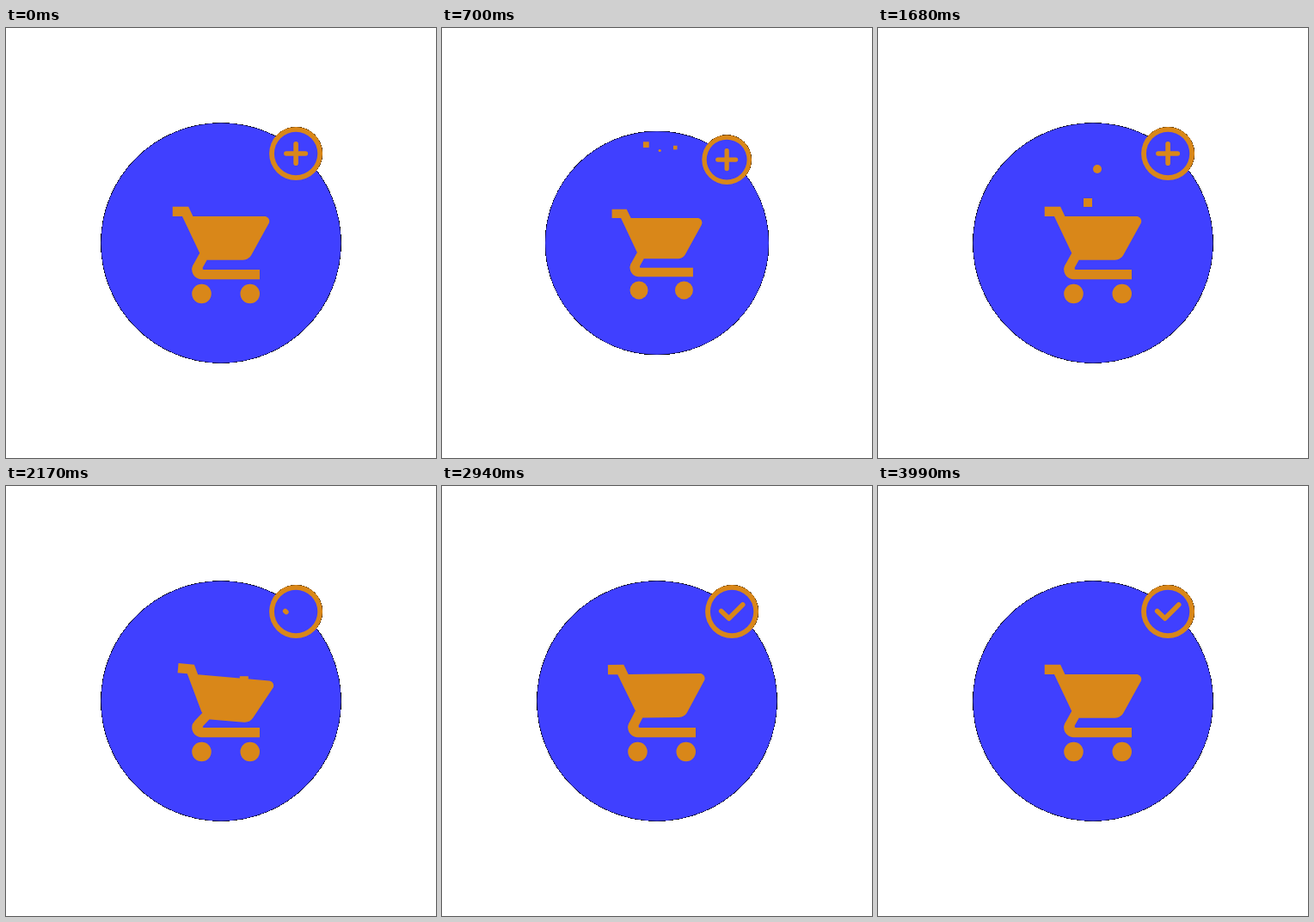
These frames come from a looping animation (500x500 px, 4.34 s). An HTML page:

```html
<!DOCTYPE html>
<html lang="en">
<head>
<meta charset="utf-8">
<title>Add to cart</title>
<style>
  html, body { margin: 0; width: 100%; height: 100%; overflow: hidden; background: #fff; }
  svg { display: block; width: 100%; height: 100%; }
  .blue { fill: #4040ff; }
  .orange { fill: #d98719; }
  .line { fill: none; stroke: #d98719; stroke-width: 5.6; stroke-linecap: round; stroke-linejoin: round; }
</style>
</head>
<body>
<svg viewBox="0 0 500 500">
  <g id="scene">
    <!-- dark, unsmoothed rim behind both discs -->
    <g shape-rendering="crispEdges">
      <circle cx="250" cy="250" r="140"/>
      <circle cx="337.1" cy="146" r="31.2"/>
    </g>
    <circle class="blue" cx="250" cy="250" r="139.4"/>
    <g id="items" class="orange">
      <rect/>
      <rect/>
      <circle/>
    </g>
    <g class="orange" transform="translate(188.1 196.5) scale(5.625)">
      <circle cx="7" cy="20" r="2"/>
      <circle cx="17" cy="20" r="2"/>
      <path d="M5.25 14.04c-.16.28-.25.61-.25.96 0 1.1.9 2 2 2h12v-2H7.42c-.14 0-.25-.11-.25-.25l.03-.12z"/>
      <polygon id="strut" points="6.6,11.59 8.1,12 8.1,13 7.2,14.63 7,15.5 5,15 5.25,14.04"/>
      <path id="basket" d="M1 2v2h2l3.6 7.59 1.5 1.41h7.45c.75 0 1.41-.41 1.75-1.03l3.58-6.49c.08-.14.12-.31.12-.48 0-.55-.45-1-1-1H5.21l-.94-2z"/>
    </g>
    <g transform="translate(337.1 146)">
      <circle class="orange" r="31"/>
      <circle class="blue" r="25.2"/>
      <path id="plus" class="line" d="M-11.2 0H11.2M0-11.2V11.2"/>
      <path id="check" class="line" pathLength="1" d="M-12.4-.6L-3.4 8L12.6-8"/>
    </g>
  </g>
</svg>
<script>
const LOOP = 4340, STEP = 70, LAST = 3990;

const [scene, items, strut, basket, plus, check] =
  ['scene', 'items', 'strut', 'basket', 'plus', 'check'].map(id => document.getElementById(id));

// [time, value] pairs
const PULSE = [[0, 1], [400, 0.9], [1190, 1]];
const TILT = [[1750, 0], [2170, 4.9], [2590, -3.3], [3080, 0]];
const PLUS = [[1750, 1], [2100, 0]];
const CHECK = [[2095, 0], [2640, 1]];

// Thrown items: position is p + v*u + a*u*u, stopping at the floor
const THROWN = [
  { start: 190, from: 420, x: [231, 9, 7], y: [137, -41, 43], floor: 226.2 },
  { start: 357, from: 420, x: [281, -18.5, 0], y: [141, -38, 34.5], floor: 240 },
  { start: 462, from: 1050, x: [254, 1, 0], y: [124, 2, 38], floor: 240 }
];

const clamp = v => Math.min(1, Math.max(0, v));
const ease = p => (1 - Math.cos(Math.PI * p)) / 2;
const curve = ([p, v, a], u) => p + v * u + a * u * u;

function setAttrs(node, attrs) {
  for (const name in attrs) node.setAttribute(name, attrs[name]);
}

function track(keys, t) {
  let value = keys[0][1];
  for (let i = 1; i < keys.length; i++) {
    const [t0, a] = keys[i - 1], [t1, b] = keys[i];
    if (t >= t0) value = a + (b - a) * ease(clamp((t - t0) / (t1 - t0)));
  }
  return value;
}

function drawItem({ start, from, x, y, floor }, node, t) {
  const size = 10 * clamp((t - start) / 700);
  // Solve for the landing moment so x stops together with y
  const [p, v, a] = y;
  const landing = (-v + Math.sqrt(v * v + 4 * a * (floor - p))) / (2 * a);
  const u = Math.min((t - from) / 630, landing);
  const cx = curve(x, u), cy = curve(y, u);
  setAttrs(node, node.tagName === 'circle'
    ? { cx, cy, r: size / 2 }
    : { x: cx - size / 2, y: cy - size / 2, width: size, height: size });
}

function draw(t) {
  const scale = track(PULSE, t), tilt = track(TILT, t);
  scene.setAttribute('transform', `translate(250 250) scale(${scale}) translate(-250 -250)`);

  // The strut hinges on the rounded end of the rail and leans further than the basket
  basket.setAttribute('transform', `rotate(${tilt} 5.1 16)`);
  strut.setAttribute('transform', `rotate(${tilt * 3} 7 15)`);

  THROWN.forEach((item, i) => drawItem(item, items.children[i], t));

  const plusScale = track(PLUS, t), drawn = track(CHECK, t);
  setAttrs(plus, {
    transform: `scale(${plusScale})`,
    visibility: plusScale > 0 ? 'visible' : 'hidden'
  });
  setAttrs(check, {
    'stroke-dasharray': `${drawn} 2`,
    visibility: drawn > 0 ? 'visible' : 'hidden'
  });
}

const began = performance.now();
function tick() {
  const t = (performance.now() - began) % LOOP;
  draw(Math.min(LAST, Math.floor(t / STEP) * STEP));
  requestAnimationFrame(tick);
}
tick();
</script>
</body>
</html>
```
